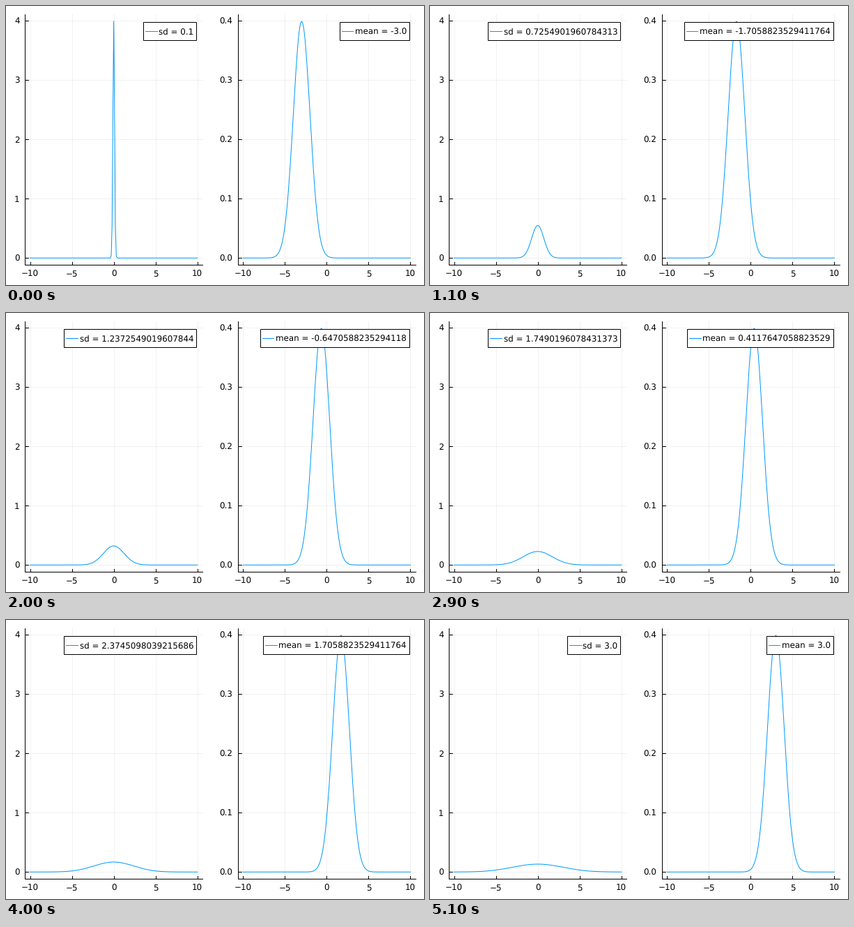
Recreate the animation shown at these times as a matplotlib script. Size 600 by 400 pixels, loop 5.2 s.

```python
import numpy as np
import matplotlib.pyplot as plt
from matplotlib.animation import FuncAnimation
from matplotlib.patches import Rectangle

FRAMES = 52
PX = 0.72            # points per pixel at 100 dpi
FONT = 11.93         # font size in pixels
BLUE = "#009AF9"
TOP, BOTTOM, BASE = 11.8, 371.4, 361.3
WIDTH = 254.4

plt.rcParams.update({"font.family": "DejaVu Sans", "font.size": FONT * PX,
                     "text.hinting": "none"})

fig = plt.figure(figsize=(6, 4), dpi=100, facecolor="white")
ax = fig.add_axes([0, 0, 1, 1])
ax.set(xlim=(0, 600), ylim=(400, 0))
ax.axis("off")

x = np.linspace(-10, 10, 201)


def line(xs, ys, color="black", **kw):
    return ax.plot(xs, ys, color=color, lw=PX, **kw)[0]


def normal(mean, sd):
    return np.exp(-((x - mean) / sd) ** 2 / 2) / (sd * np.sqrt(2 * np.pi))


def advance(text):
    """Width of a legend label in pixels."""
    narrow = {" ": 0.318, ".": 0.318, "-": 0.361, "=": 0.838, "s": 0.521,
              "d": 0.635, "m": 0.974, "e": 0.615, "a": 0.613, "n": 0.634}
    return FONT * sum(narrow.get(c, 0.636) for c in text)


class Panel:
    def __init__(self, left, y_scale, y_labels):
        self.left, self.y_scale = left, y_scale
        self.draw_axes(y_labels)
        self.curve = line([], [], BLUE, zorder=3)
        self.box = Rectangle((0, 23), 1, 26, fc="white", ec="black",
                             lw=PX, zorder=4)
        ax.add_patch(self.box)
        self.key = line([], [], BLUE, zorder=5)
        self.label = ax.text(0, 41.3, "", zorder=5)

    def to_x(self, value):
        return self.left + (value + 10.6) * 12

    def draw_axes(self, y_labels):
        left, right = self.left, self.left + WIDTH
        for value in range(-10, 11, 5):
            px = self.to_x(value)
            line([px, px], [TOP, BOTTOM], alpha=0.055, zorder=1)
            line([px, px], [BOTTOM, BOTTOM - 4.5], zorder=2)
            ax.text(px, 387.8, str(value).replace("-", "\u2212"), ha="center")
        for k, name in enumerate(y_labels):
            py = BASE - 85.06 * k
            line([left, right], [py, py], alpha=0.055, zorder=1)
            line([left, left + 4.5], [py, py], zorder=2)
            ax.text(left - 7.8, py + 4.4, name, ha="right")
        line([left, left, right], [TOP, BOTTOM, BOTTOM], zorder=2)

    def update(self, density, text):
        self.curve.set_data(self.to_x(x), BASE - density * self.y_scale)
        edge = self.left + 246
        start = edge - 3.7 - advance(text)
        self.box.set_x(start - 22.2)
        self.box.set_width(edge - start + 22.2)
        self.key.set_data([start - 19.2, start - 2.7], [36.4, 36.4])
        self.label.set_x(start)
        self.label.set_text(text)


spread = Panel(27.45, 85.06, ["0", "1", "2", "3", "4"])
shift = Panel(333.2, 850.6, ["0.0", "0.1", "0.2", "0.3", "0.4"])


def update(i):
    sd = (51 + 29 * i) / 510       # 0.1 to 3
    mean = (6 * i - 153) / 51      # -3 to 3
    spread.update(normal(0, sd), f"sd = {sd!r}")
    shift.update(normal(mean, 1), f"mean = {mean!r}")
    return []


anim = FuncAnimation(fig, update, frames=FRAMES, interval=100,
                     repeat=True, repeat_delay=0)
plt.show()
```
